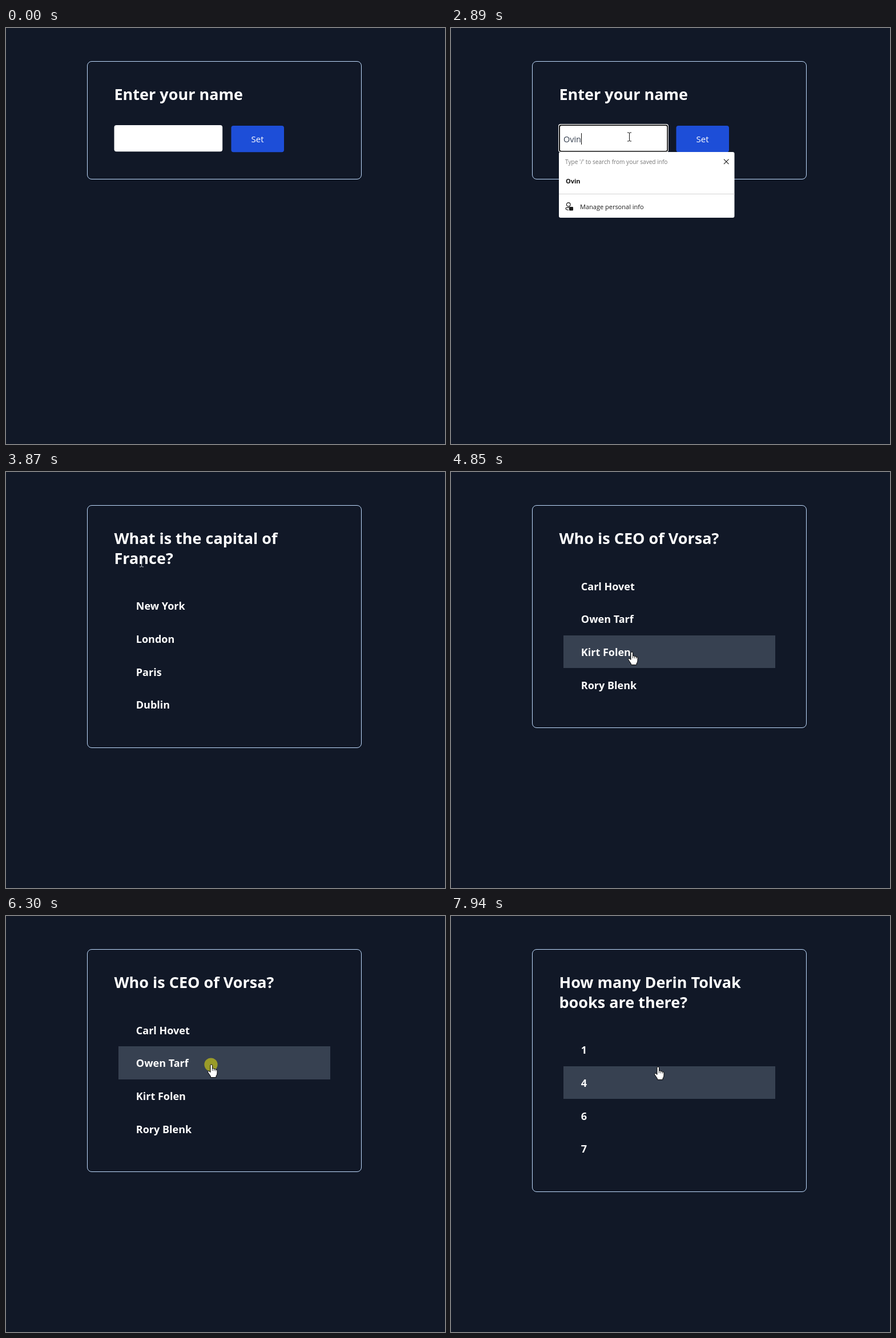
Recreate the animation shown at these times as an HTML page with a canvas. Size 769 px wide and 728 px high, loop 8000 ms.

```html
<!DOCTYPE html>
<html lang="en">
<head>
<meta charset="utf-8">
<title>Quiz</title>
<style>
  html, body { margin: 0; width: 100%; height: 100%; overflow: hidden; background: #111827; }
  canvas { display: block; }
</style>
</head>
<body>
<canvas id="stage" width="769" height="728"></canvas>
<script>
const ctx = document.getElementById('stage').getContext('2d');
const LOOP = 8000;
const TICK = 65.6; // the pointer is sampled at this interval
const FONT = '"Open Sans", "Noto Sans", sans-serif';
const ROW = 57.7;
const LINE = 34.6;

const pages = [
  { title: ['Enter your name'] },
  { title: ['What is the capital of', 'France?'], options: ['New York', 'London', 'Paris', 'Dublin'] },
  { title: ['Who is CEO of Vorsa?'], options: ['Carl Hovet', 'Owen Tarf', 'Kirt Folen', 'Rory Blenk'] },
  { title: ['The uVanto was created by', 'which company?'], options: ['Orbel', 'Kadro', 'Zelvar', 'Trundalex'] },
  { title: ['How many Derin Tolvak', 'books are there?'], options: ['1', '4', '6', '7'] }
];

const typed = 'Ovin';
const saved = ['Tahmiron', '3', 'Tahmiron Kel', '4', '2', typed];
const TYPE_START = 1960;
const TYPE_STEP = 157;

// the first click focuses the field, every later one turns the page on release
const clicks = [910, 3270, 4530, 6300, 6690];
const HOLD = 190;

const entry = { x: 733, y: 716 };
const moves = [
  { from: 66, to: 720, x: 286, y: 190 },
  { from: 720, to: 850, x: 312, y: 190 },
  { from: 2890, to: 3220, x: 440, y: 197 },
  { from: 3460, to: 3870, x: 237, y: 158 },
  { from: 3870, to: 4070, x: 240, y: 100 },
  { from: 4070, to: 4490, x: 318, y: 338 },
  { from: 4720, to: 4850, x: 317, y: 315 },
  { from: 4850, to: 5450, x: 362, y: 250 },
  { from: 5510, to: 5640, x: 360, y: 260 },
  { from: 6490, to: 6690, x: 362, y: 245 },
  { from: 6890, to: 7680, x: 364, y: 252 },
  { from: 7745, to: 7930, x: 363, y: 264 }
];

const handShape = new Path2D('M-2 1.5Q-2 0-.2 0 1.6 0 1.6 1.5V7Q3 6 4.6 7.6 6 7 7.4 8.6 10 8.4 10 10.5V15Q10 18 8 20V22.5H-1.5V20.5L-6 14Q-7 12-5.5 11.2-4 11-2 13.5Z');
const arrowShape = new Path2D('M0 0V16L3.7 12.5 6.3 18 8.6 17 6 11.5 11 11Z');
const beamShape = new Path2D('M-3.5-7.5H-1L0-6.5 1-7.5H3.5M0-6.5V6.5M-3.5 7.5H-1L0 6.5 1 7.5H3.5');
const crossShape = new Path2D('M478 229.7L486.5 238.2M486.5 229.7L478 238.2');
const personShape = new Path2D('M9 4A3.3 3.3 0 1 1 2.4 4A3.3 3.3 0 1 1 9 4M7 9.3H2.5Q1 9.3 1 10.8Q1.2 13.5 6 13.5');

function text(str, x, y, size, color, weight = 400) {
  ctx.font = `${weight} ${size}px ${FONT}`;
  ctx.fillStyle = color;
  ctx.fillText(str, x, y);
}

function box(x, y, w, h, r, color) {
  ctx.fillStyle = color;
  ctx.beginPath();
  ctx.roundRect(x, y, w, h, r);
  ctx.fill();
}

function stroke(shape, color, width = 1) {
  ctx.strokeStyle = color;
  ctx.lineWidth = width;
  ctx.stroke(shape);
}

function inside(p, x, y, w, h) {
  return p.x >= x && p.x < x + w && p.y >= y && p.y < y + h;
}

const ease = u => u * u * (3 - 2 * u);
const rowsTop = page => 170.3 + LINE * (page.title.length - 1);

function pointerAt(t) {
  const time = Math.floor((t + 20) / TICK) * TICK;
  if (time < TICK) return null;
  let { x, y } = entry;
  for (const m of moves) {
    if (time <= m.from) break;
    const u = ease(Math.min(1, (time - m.from) / (m.to - m.from)));
    x += (m.x - x) * u;
    y += (m.y - y) * u;
  }
  return { x, y };
}

function hoveredRow(page, p) {
  if (!p || !page.options || p.x < 197 || p.x > 568) return -1;
  const row = Math.floor((p.y - rowsTop(page)) / ROW);
  return row < page.options.length ? row : -1;
}

function drawCard(page) {
  const content = page.options ? page.options.length * ROW : 47.5;
  const bottom = Math.floor(rowsTop(page) + content + 46.8) + .5;
  const card = new Path2D();
  card.roundRect(142.5, 58.5, 480, bottom - 58.5, 7.5);
  stroke(card, '#bfdbfe');
  page.title.forEach((line, i) => text(line, 189.5, 126 + LINE * i, 27, '#fff', 700));
}

function drawOptions(page, hover) {
  page.options.forEach((label, i) => {
    const y = rowsTop(page) + i * ROW;
    const top = Math.round(y);
    if (i === hover) box(197, top, 371, Math.round(y + ROW) - top, 0, '#374151');
    text(label, 227.8, y + 36.2, 18, '#fff', 700);
  });
}

function drawPopup(items) {
  const line = 254.5 + 36.5 * items.length;
  box(189, 217, 307.5, line + 41 - 217, 3, '#fff');
  text('Type \'/\' to search from your saved info', 200, 237.5, 10.1, '#767676');
  stroke(crossShape, '#222', 1.2);
  items.forEach((item, i) => text(item, 201, 272 + 36.5 * i, 11, '#111', 700));
  box(189, Math.floor(line) - 1, 307.5, 1, 0, '#d4d4d4');

  ctx.save();
  ctx.translate(200, line + 14);
  stroke(personShape, '#1b1b1b', 1.2);
  box(7, 8, 7, 6.5, 1.2, '#1b1b1b');
  ctx.restore();
  text('Manage personal info', 226, line + 25.5, 11, '#1b1b1b');
}

function drawForm(t) {
  const focused = t >= clicks[0] && t < clicks[1];
  if (focused) {
    box(188, 168, 193, 49.5, 4, '#fff');
    box(189, 169.2, 191, 47.3, 3.5, '#101010');
    box(191, 171, 187.3, 44, 2.5, '#fff');
  } else {
    box(189.5, 170, 189.7, 46.3, 4, '#fff');
  }
  box(394.5, 171, 92.5, 46.2, 4, '#1d4ed8');
  text('Set', 429.5, 200, 15, '#fff');

  const count = Math.max(0, Math.floor((t - TYPE_START) / TYPE_STEP) + 1);
  const value = typed.slice(0, count);
  text(value, 197, 200, 14.4, '#374151');
  // the caret stays lit for a while after focus and after the last key
  const lastKey = TYPE_START + TYPE_STEP * (typed.length - 1);
  const caret = count ? t < lastKey + 530 : t < 1570;
  if (focused && caret && t >= 1040) {
    box(Math.round(197 + ctx.measureText(value).width), 184, 1, 20, 0, '#111');
  }
  if (focused && t >= 1040) drawPopup(count ? [typed] : saved);
}

function pointerKind(page, p, hover) {
  if (!page.options) {
    if (inside(p, 189, 170, 190, 46)) return 'darkBeam';
    if (inside(p, 394, 171, 93, 46)) return 'hand';
  }
  if (hover >= 0) return 'hand';
  return inside(p, 190, 98, 300, 35 * page.title.length) ? 'beam' : 'arrow';
}

function drawPointer(kind, p, pressed) {
  ctx.save();
  ctx.translate(Math.round(p.x), Math.round(p.y));
  if (pressed) {
    ctx.fillStyle = 'rgba(232,226,10,.56)';
    ctx.beginPath();
    ctx.arc(-1, 0, 11.6, 0, 2 * Math.PI);
    ctx.fill();
  }
  if (kind === 'hand' || kind === 'arrow') {
    const shape = kind === 'hand' ? handShape : arrowShape;
    ctx.fillStyle = '#fff';
    ctx.fill(shape);
    stroke(shape, '#000');
    if (kind === 'hand') {
      for (let i = 0; i < 3; i++) box(1.2 + 2.9 * i, 7 + .8 * i, .8, 4 - .5 * i, 0, '#000');
    }
  } else {
    ctx.translate(.5, .5);
    stroke(beamShape, kind === 'beam' ? '#c9ced6' : '#111');
  }
  ctx.restore();
}

function draw(t) {
  const turns = clicks.slice(1).filter(c => t >= c + HOLD).length;
  const page = pages[turns];
  const p = pointerAt(t);
  const hover = hoveredRow(page, p);
  ctx.fillStyle = '#111827';
  ctx.fillRect(0, 0, 769, 728);
  drawCard(page);
  if (page.options) drawOptions(page, hover);
  else drawForm(t);
  if (p) {
    const pressed = clicks.some(c => t >= c && t < c + HOLD);
    drawPointer(pointerKind(page, p, hover), p, pressed);
  }
}

const start = performance.now();
function loop() {
  draw((performance.now() - start) % LOOP);
  requestAnimationFrame(loop);
}
loop();
</script>
</body>
</html>
```
